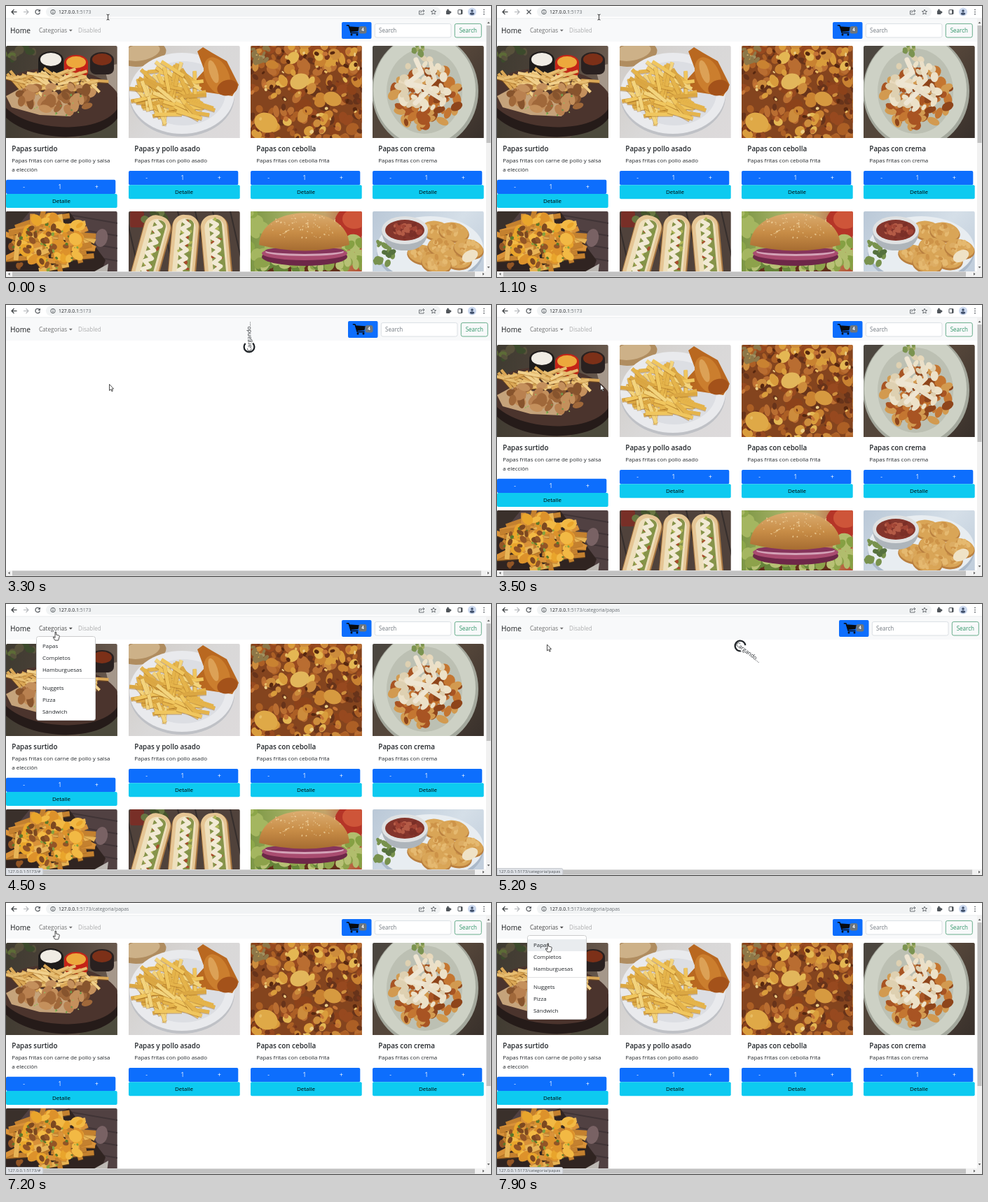
Recreate the animation shown at these times as an HTML page with a canvas. Size 692 by 388 pixels, loop 8000 ms.

```html
<!DOCTYPE html>
<html lang="es">
<head>
<meta charset="utf-8">
<title>Menú</title>
<style>
html, body { margin: 0; width: 692px; height: 388px; overflow: hidden; background: #fff; }
canvas { display: block; }
</style>
</head>
<body>
<canvas id="stage" width="692" height="388"></canvas>
<script>
const LOOP = 8000, TAU = Math.PI * 2;
const stage = document.getElementById('stage').getContext('2d');
let ctx = stage;

let seed = 1;
const rnd = () => (seed = seed * 16807 % 2147483647) / 2147483647;
const pick = list => list[Math.floor(rnd() * list.length)];

function rect(color, x, y, w, h, r = 0, border) {
  ctx.beginPath();
  ctx.roundRect(x, y, w, h, r);
  if (color) { ctx.fillStyle = color; ctx.fill(); }
  if (border) { ctx.strokeStyle = border; ctx.lineWidth = 1; ctx.stroke(); }
}
function oval(color, x, y, rx, ry = rx, turn = 0) {
  ctx.beginPath();
  ctx.ellipse(x, y, rx, ry, turn, 0, TAU);
  ctx.fillStyle = color;
  ctx.fill();
}
function ring(color, width, x, y, r, from = 0, to = TAU) {
  ctx.beginPath();
  ctx.arc(x, y, r, from, to);
  ctx.strokeStyle = color;
  ctx.lineWidth = width;
  ctx.stroke();
}
function trace(points) {
  ctx.beginPath();
  for (let i = 0; i < points.length; i += 2) ctx.lineTo(points[i], points[i + 1]);
}
function poly(color, ...points) {
  trace(points);
  ctx.closePath();
  ctx.fillStyle = color;
  ctx.fill();
}
function line(color, width, ...points) {
  trace(points);
  ctx.strokeStyle = color;
  ctx.lineWidth = width;
  ctx.stroke();
}
function text(str, x, y, size = 7.95, color = '#212529', weight = 400, align = 'left') {
  ctx.font = `${weight} ${size}px "Open Sans", "Noto Sans", sans-serif`;
  ctx.textAlign = align;
  ctx.fillStyle = color;
  ctx.fillText(str, x, y + size * 0.36);
}
function blend(x0, y0, x1, y1, ...colors) {
  const g = ctx.createLinearGradient(x0, y0, x1, y1);
  colors.forEach((c, i) => g.addColorStop(i / (colors.length - 1), c));
  return g;
}

// Scatter helpers: positions fall inside an ellipse.
function scatter(n, x, y, rx, ry, put) {
  for (let i = 0; i < n; i++) {
    const a = rnd() * TAU, d = Math.sqrt(rnd());
    put(x + Math.cos(a) * d * rx, y + Math.sin(a) * d * ry);
  }
}
function chunks(n, colors, x, y, rx, ry, small, big) {
  scatter(n, x, y, rx, ry, (px, py) => {
    const r = small + rnd() * (big - small);
    oval(pick(colors), px, py, r, r * (0.5 + rnd() * 0.4), rnd() * 3);
  });
}
function sticks(n, colors, x, y, rx, ry, length, width, lean = 0.6, spread = 2) {
  scatter(n, x, y, rx, ry, (px, py) => {
    const a = lean + (rnd() - 0.5) * spread, l = length * (0.6 + rnd() * 0.5) / 2;
    const dx = Math.cos(a) * l, dy = Math.sin(a) * l;
    line('rgba(150,92,20,.4)', width + 1, px - dx, py - dy + 0.8, px + dx, py + dy + 0.8);
    line(pick(colors), width, px - dx, py - dy, px + dx, py + dy);
  });
}
function dip(x, y, rx, ry, cup, sauce) {
  rect(cup, x - rx, y, rx * 2, ry * 1.9, [0, 0, 8, 8]);
  oval(cup, x, y, rx, ry);
  oval(sauce, x, y - 0.5, rx - 3, ry - 2.5);
}

const photos = [
  function mixedBoard() {
    rect(blend(0, 0, 159, 20, '#3f3b31', '#4d4239', '#6a5a4e'), 0, 0, 159, 132);
    chunks(10, ['#5d6b37', '#3c4a2c', '#57513b'], 16, 8, 26, 12, 4, 8);
    poly('#a5978a', 140, 30, 159, 26, 159, 66, 148, 62);
    poly('#4c4a3c', 128, 104, 159, 84, 159, 132, 104, 132);
    oval('#251b19', 76, 84, 88, 46, 0.08);
    oval('#4b342d', 76, 74, 86, 42, 0.08);
    poly('#c5a37b', 0, 72, 22, 60, 110, 78, 92, 101, 48, 99, 8, 88);
    dip(64, 20, 18, 12, '#1f1c1b', '#f0ece4');
    dip(100, 24, 17, 11, '#c42418', '#eda83c');
    dip(137, 20, 17, 11, '#2a2120', '#7c3018');
    sticks(60, ['#e7bd70', '#f1d08b', '#dba857'], 73, 52, 68, 14, 30, 4, 0.2, 1.4);
    chunks(42, ['#a0683a', '#b98150', '#87542d', '#c4905c'], 72, 74, 55, 20, 6, 11);
    chunks(12, ['#71984a', '#9cb461'], 80, 80, 46, 20, 1, 2);
  },
  function roastChicken() {
    rect(blend(0, 0, 159, 132, '#cfcac5', '#d9d8d8', '#dddadb'), 0, 0, 159, 132);
    oval('#b08d60', 20, 12, 34, 17, -0.2);
    oval('#cdb188', 18, 9, 27, 12, -0.2);
    oval('#bfc1c6', 76, 72, 75, 58);
    oval('#e9eaed', 76, 68, 75, 58);
    oval('#dcdee3', 78, 68, 60, 46);
    poly('#b96820', 98, 8, 106, 2, 119, 10, 140, 22, 157, 56, 148, 72, 108, 66, 90, 55, 108, 35);
    oval('#cb7e2e', 126, 43, 17, 28, -0.4);
    oval('#a4521a', 141, 60, 15, 11, -0.3);
    oval('#dca156', 121, 37, 6, 17, -0.3);
    sticks(92, ['#f0c65e', '#e5b44b', '#f3d47d', '#dba743'], 56, 66, 41, 34, 38, 5, 0.8, 2.2);
    sticks(15, ['#f0c65e', '#e5b44b'], 78, 90, 34, 12, 37, 5, 0.4, 1.2);
  },
  function onionPotatoes() {
    rect('#84441e', 0, 0, 159, 132);
    chunks(230, ['#8c421a', '#ac5f25', '#67331a', '#b96d31', '#97491f'], 80, 66, 112, 95, 4, 10);
    chunks(90, ['#d99c3c', '#c98231', '#e4b753', '#cd8c3c'], 80, 66, 104, 88, 4, 10);
    chunks(70, ['#57270f', '#76351a', '#c57435'], 80, 66, 110, 88, 2, 4);
    chunks(18, ['#a39261', '#8d7748'], 12, 8, 22, 16, 3, 7);
    oval('#dfa947', 22, 110, 17, 14, 0.4);
    oval('#e2b65b', 70, 51, 14, 11, -0.4);
    oval('#d69a40', 117, 76, 13, 10, 0.4);
    chunks(28, ['#eccd85', '#e7bd66'], 80, 66, 100, 83, 1, 3);
  },
  function creamPotatoes() {
    rect(blend(0, 0, 159, 132, '#4a4640', '#55463a', '#38302b'), 0, 0, 159, 132);
    oval('#a3a79c', 75, 65, 76, 82);
    oval('#cdd1c5', 74, 63, 73, 79);
    oval('#bcc0b3', 74, 65, 54, 61);
    chunks(85, ['#a85423', '#c47631', '#d29a50', '#8e451b'], 76, 74, 47, 45, 5, 10);
    chunks(42, ['#ece1c8', '#ded0b1', '#e8d9bc'], 72, 57, 36, 39, 4, 9);
    ctx.lineJoin = ctx.lineCap = 'round';
    line('#eee5d2', 7, 62, 20, 70, 38, 50, 54, 83, 61, 61, 82);
    line('#eadfc8', 6, 83, 25, 89, 48, 75, 62, 97, 76);
    ctx.lineCap = 'butt';
    chunks(9, ['#7b9350', '#a4ad68'], 70, 5, 12, 8, 3, 5);
  },
  function cheeseFries() {
    rect('#514142', 0, 0, 159, 132);
    for (let y = 5; y < 132; y += 18) line('#403436', 2, 90, y, 159, y + 12);
    oval('#796264', 136, 38, 9, 13, 0.2);
    poly('#3a302b', 0, 0, 34, 0, 16, 22, 0, 30);
    poly('#302421', 0, 35, 90, 0, 142, 70, 120, 132, 0, 132);
    poly('#bdb9b4', 112, 94, 146, 75, 139, 132, 97, 132);
    sticks(65, ['#d99239', '#e8b456', '#c4812f'], 62, 44, 55, 38, 42, 7, 0.65, 2.3);
    chunks(55, ['#e9a52c', '#f2b944', '#dd922b'], 66, 40, 48, 35, 5, 11);
    chunks(25, ['#7c4820', '#925526'], 48, 57, 48, 38, 3, 6);
    chunks(28, ['#5b792a', '#87a13d'], 56, 52, 48, 34, 1, 3);
  },
  function hotDogs() {
    rect('#50423b', 0, 0, 159, 132);
    for (let x = -30; x < 180; x += 25) line('#352e2c', 2, x, 0, x + 30, 132);
    rect('#782f27', 2, 0, 20, 23, 3);
    chunks(12, ['#45532c', '#687642'], 38, 10, 15, 14, 3, 7);
    for (let i = 0; i < 3; i++) {
      ctx.save();
      ctx.translate(33 + i * 46, 53);
      ctx.rotate(0.27 - i * 0.18);
      rect('#a97842', -20, -47, 40, 104, 17);
      rect('#e5c594', -19, -48, 37, 101, 16);
      rect('#eee0bd', -14, -43, 28, 91, 13);
      rect('#87944b', -7, -42, 18, 91, 8);
      chunks(24, ['#a74c2b', '#b0b657', '#819444'], 2, 2, 8, 44, 2, 4);
      const zig = [];
      for (let k = 0; k < 14; k++) zig.push(k % 2 ? 4 : -5, -40 + k * 6);
      ctx.lineJoin = 'round';
      line('#f2ead5', 6, ...zig);
      ctx.restore();
    }
  },
  function burger() {
    rect(blend(0, 0, 159, 0, '#7c9645', '#a1ae62', '#c4a36a', '#b24b32'), 0, 0, 159, 132);
    chunks(24, ['#8ca649', '#6c873a', '#a4b660'], 6, 40, 24, 45, 6, 13);
    oval('#b53528', 145, 16, 25, 23);
    oval('#ce5539', 148, 11, 17, 14);
    chunks(16, ['#85a043', '#b1bd6d'], 150, 61, 22, 24, 6, 11);
    rect('#62301c', 21, 72, 116, 36, 14);
    chunks(36, ['#8da24b', '#66843a', '#b7c175'], 78, 76, 68, 9, 6, 11);
    oval('#6d2748', 77, 65, 61, 13);
    oval('#a94c70', 77, 60, 61, 10);
    oval('#d3a2b7', 77, 58, 56, 6);
    oval('#86345b', 77, 56, 56, 5);
    ctx.beginPath();
    ctx.moveTo(12, 48);
    ctx.bezierCurveTo(14, -12, 138, -14, 141, 48);
    ctx.quadraticCurveTo(78, 65, 12, 48);
    ctx.fillStyle = blend(0, 3, 0, 58, '#dbac6f', '#c78c46', '#a46a30');
    ctx.fill();
    chunks(70, ['#eccb94', '#e2bd84'], 77, 22, 51, 18, 0.6, 1.4);
  },
  function nuggets() {
    rect(blend(0, 0, 159, 132, '#bac8d7', '#d5dfe8', '#b7c5d5'), 0, 0, 159, 132);
    oval('#abb9c9', 82, 58, 76, 47);
    oval('#e8edf1', 82, 53, 76, 46);
    chunks(14, ['#56713e', '#78924e'], 13, 60, 15, 20, 3, 7);
    const spots = [91, 27, 116, 29, 71, 61, 100, 51, 120, 68, 137, 53, 91, 74];
    for (let i = 0; i < spots.length; i += 2) {
      const [x, y] = [spots[i], spots[i + 1]];
      oval('#ba8040', x, y + 2, 22, 14, 0.2);
      oval('#d9a557', x, y, 21, 13, 0.2);
      chunks(18, ['#e5b970', '#cd9348', '#ddad64'], x, y, 17, 9, 2, 5);
    }
    oval('#efe2c6', 139, 64, 12, 8, -0.5);
    rect('#aeb5bb', 13, 28, 66, 28, [0, 0, 28, 28]);
    oval('#dfe1e2', 46, 27, 33, 20);
    oval('#84352c', 46, 27, 28, 15);
    chunks(30, ['#a14435', '#b45b46', '#7b2f27'], 46, 27, 22, 11, 2, 5);
  }
];

const COLS = [0, 175, 349, 523];
const DISHES = [
  ['Papas surtido', 'Papas fritas con carne de pollo y salsa', 'a elección'],
  ['Papas y pollo asado', 'Papas fritas con pollo asado'],
  ['Papas con cebolla', 'Papas fritas con cebolla frita'],
  ['Papas con crema', 'Papas fritas con crema']
];

function photo(i) {
  seed = 911 + i * 137;
  ctx.save();
  ctx.translate(COLS[i % 4], i < 4 ? 57 : 294);
  ctx.beginPath();
  ctx.roundRect(0, 0, 158.7, 132, [2, 2, 0, 0]);
  ctx.clip();
  photos[i]();
  ctx.restore();
}
function card([title, ...lines], i) {
  const x = COLS[i], y = 223.2 + lines.length * 12.8;
  text(title, x + 8.3, 204.5, 9.9, '#212529', 600);
  lines.forEach((l, k) => text(l, x + 8.3, 221.5 + k * 12.8));
  rect('#0d6efd', x, y, 156.3, 20.2, 2);
  text('-', x + 25.5, y + 10, 8.4, '#fff', 400, 'center');
  text('1', x + 77, y + 10, 8.4, '#fff', 400, 'center');
  text('+', x + 129.5, y + 10, 8.4, '#fff', 400, 'center');
  rect('#0dcaf0', x, y + 20.2, 158.7, 20, 2);
  text('Detalle', x + 79, y + 30.2, 8, '#000', 400, 'center');
}
function renderGrid(count) {
  const sheet = document.createElement('canvas');
  sheet.width = 692;
  sheet.height = 388;
  ctx = sheet.getContext('2d');
  for (let i = 0; i < count; i++) photo(i);
  DISHES.forEach(card);
  ctx = stage;
  return sheet;
}
const fullGrid = renderGrid(8), potatoGrid = renderGrid(5);

function toolbar(reloading, path) {
  const ink = '#50555a';
  rect('#fff', 0, 0, 692, 18);
  rect('#f1f3f4', 57, 1.5, 563, 14, 7);
  line('#3c4043', 1.2, 15.5, 8.5, 8, 8.5);
  line('#3c4043', 1.2, 11.5, 5, 8, 8.5, 11.5, 12);
  line('#b4b7ba', 1.1, 25, 8.5, 32, 8.5);
  line('#b4b7ba', 1.1, 28.5, 5, 32, 8.5, 28.5, 12);
  if (reloading) {
    line(ink, 1.2, 42.5, 5.5, 48.5, 11.5);
    line(ink, 1.2, 48.5, 5.5, 42.5, 11.5);
  } else {
    ring(ink, 1.2, 45.2, 8.5, 3.2, 0.2, 5.5);
    poly(ink, 49, 4.5, 49, 8, 45.5, 8);
  }
  ring(ink, 0.9, 67, 8.5, 3.2);
  line(ink, 1, 67, 8, 67, 10.5);
  line(ink, 1, 67, 6.2, 67, 7.2);
  text('127.0.0.1', 75, 8.7, 6.85, '#202124');
  const host = ctx.measureText('127.0.0.1').width;
  text(':5173' + path, 75 + host, 8.7, 6.85, '#6a6f74');

  line(ink, 0.8, 592, 7, 589.5, 7, 589.5, 12, 596, 12, 596, 10);
  line(ink, 0.8, 591.5, 10, 593, 7, 597, 7);
  line(ink, 0.8, 595, 5, 597, 7, 595, 9);
  const star = [];
  for (let k = 0; k <= 10; k++) {
    const a = k * Math.PI / 5 - Math.PI / 2, r = k % 2 ? 1.7 : 3.8;
    star.push(610 + Math.cos(a) * r, 8.8 + Math.sin(a) * r);
  }
  line(ink, 0.8, ...star);
  rect(ink, 628, 6.5, 5.5, 5.5, 1);
  oval(ink, 630.5, 6, 1.4);
  oval(ink, 634, 9, 1.4);
  rect(null, 645, 5.5, 6, 6, 0.5, ink);
  rect(ink, 649, 5.5, 2, 6);
  oval('#cbd8ee', 665, 8.5, 6);
  oval('#40506c', 665, 7, 1.8);
  oval('#40506c', 665, 11, 3.2, 1.8);
  for (const y of [5.3, 8.5, 11.7]) oval(ink, 682, y, 0.85);
}

function navbar(shift, open) {
  rect('#f8f9fa', 0, 18, 692, 33);
  rect('#e4e6e8', 0, 17.5, 692, 0.7);
  text('Home', 6, 35.5, 10.2, '#1b1d1f');
  const link = `rgba(0,0,0,${open ? 0.7 : 0.55})`;
  text('Categorias', 47, 35.3, 8.1, link);
  poly(link, 89.8, 33.8, 94.8, 33.8, 92.3, 36.4);
  text('Disabled', 103, 35.3, 8.1, 'rgba(0,0,0,.3)');
  ctx.save();
  ctx.translate(shift, 0);
  rect('#0d6efd', 479, 23, 42.5, 24, 2);
  ctx.lineJoin = 'round';
  line('#080b10', 1.4, 485.8, 27.8, 489, 27.8, 492.2, 38.5, 502.5, 38.5);
  poly('#080b10', 489, 29.3, 504, 30.3, 502.3, 36.2, 491.5, 37);
  oval('#080b10', 493, 41, 1.5);
  oval('#080b10', 501, 41, 1.5);
  rect('#6c757d', 503.5, 29, 11, 10.5, 3);
  text('4', 509, 34.3, 6.1, '#fff', 700, 'center');
  rect('#fff', 526.3, 25.4, 108.7, 19.6, 2.5, '#dbdfe3');
  text('Search', 532, 35.3, 8.05, '#747b82');
  rect(null, 640.3, 25.4, 38, 19.6, 2.5, '#68ad8c');
  text('Search', 659.3, 35.3, 8.05, '#2f9467', 400, 'center');
  ctx.restore();
}

function scrollbars(thumb) {
  const right = thumb ? 685 : 692, ink = '#606060';
  rect('#f1f1f1', 0, 380, 692, 8);
  rect('#c1c1c1', 9, 380.5, right - 23 + (thumb ? -2 : 0), 7);
  poly(ink, 3, 383.8, 5.5, 381.8, 5.5, 385.8);
  poly(ink, right - 2.5, 383.8, right - 5, 381.8, right - 5, 385.8);
  if (!thumb) return;
  rect('#f1f1f1', 685, 18, 7, 362);
  rect('#c1c1c1', 685.5, 28, 6, thumb);
  poly(ink, 688.5, 22.5, 686.6, 25, 690.4, 25);
  poly(ink, 688.5, 375.5, 686.6, 373, 690.4, 373);
}

function menu(hover) {
  rect('#fff', 43.5, 46.5, 84, 120, 3, '#cbcccd');
  if (hover) rect('#e9ecef', 44, 52, 83, 17);
  ['Papas', 'Completos', 'Hamburguesas', 'Nuggets', 'Pizza', 'Sándwich'].forEach((item, i) =>
    text(item, 52, 60.3 + i * 17 + (i > 2 ? 8.7 : 0)));
  line('#d9dadb', 0.8, 44, 106.5, 127, 106.5);
}

function status(path) {
  const str = '127.0.0.1:5173' + path;
  ctx.font = '400 6px "Open Sans", "Noto Sans", sans-serif';
  rect('#dee1e6', 0, 378.5, ctx.measureText(str).width + 6, 10, [0, 2, 0, 0], '#c8cbd0');
  text(str, 2.5, 383.3, 6, '#4f5458');
}

function spinner(degrees) {
  ctx.save();
  ctx.translate(347, 60);
  ctx.rotate(degrees * Math.PI / 180);
  ring('#212529', 2.3, 0, 0, 7.4, Math.PI / 4, Math.PI * 7 / 4);
  text('Cargando...', -6.3, 0.2);
  ctx.restore();
}

const cursors = {
  beam() {
    line('#222', 0.9, -2, -4, 0, -3.4, 2, -4);
    line('#222', 0.9, 0, -3.5, 0, 3.5);
    line('#222', 0.9, -2, 4, 0, 3.4, 2, 4);
  },
  arrow() {
    const shape = [0, 0, 0, 9, 2, 7.2, 3.5, 10.2, 4.8, 9.6, 3.4, 6.7, 6, 6.5];
    poly('#fff', ...shape);
    line('#222', 0.8, ...shape, 0, 0);
  },
  hand() {
    const shape = [0, 0, 1.4, 0, 1.6, 4, 5.6, 5, 6.3, 6.2, 5.3, 10, 4.7, 12, 0, 12, -2.7, 8, -2.2, 7, 0, 8.4];
    poly('#fff', ...shape);
    line('#222', 0.8, ...shape, 0, 0);
  }
};
// Each stop: time, x, y, and the pointer shown from then on.
const route = [
  [0, 145.5, 16, 'beam'], [1300, 145.5, 16, 'arrow'], [1850, 353, 69, 'beam'],
  [2900, 353, 69, 'arrow'], [3300, 147.5, 113.5, 'arrow'], [3700, 147.5, 113.5, 'arrow'],
  [4150, 70, 40, 'hand'], [4600, 70, 40, 'hand'], [4850, 71.5, 58, 'hand'],
  [5100, 71.5, 58, 'arrow'], [6000, 71.5, 58, 'arrow'], [6300, 70, 52, 'arrow'],
  [6900, 70, 52, 'arrow'], [7100, 70, 40, 'hand'], [7450, 70, 40, 'hand'],
  [7700, 72, 58, 'hand'], [LOOP, 72, 58, 'hand']
];
function pointer(t) {
  const i = route.findIndex(stop => stop[0] > t) - 1;
  const [t0, x0, y0, kind] = route[i], [t1, x1, y1] = route[i + 1];
  const p = (t - t0) / (t1 - t0), e = p * p * (3 - 2 * p);
  ctx.save();
  ctx.translate(x0 + (x1 - x0) * e, y0 + (y1 - y0) * e);
  cursors[kind]();
  ctx.restore();
}

const within = (t, a, b) => t >= a && t < b;
function draw(t) {
  const firstLoad = within(t, 1250, 3400), secondLoad = within(t, 5050, 6900);
  const loading = firstLoad || secondLoad;
  const filtered = t >= 5050;
  const open = within(t, 4250, 5050) || t >= 7350;
  const hover = within(t, 4720, 5050) || t >= 7600;

  rect('#fff', 0, 0, 692, 388);
  if (!loading) ctx.drawImage(filtered ? potatoGrid : fullGrid, 0, 0);
  toolbar(within(t, 1050, 1600), filtered ? '/categoria/papas' : '');
  navbar(loading ? 9 : 0, open);
  scrollbars(loading ? 0 : filtered ? 234 : 168);
  if (firstLoad) spinner(114 + (t - 2200) * 0.467);
  if (secondLoad) spinner(-29 + (t - 6600) * 0.467);
  if (open) menu(hover);
  if (hover || within(t, 5050, 5600)) status('/categoria/papas');
  else if (within(t, 4100, 4720) || within(t, 7050, 7600)) status('/#');
  pointer(t);
}

function tick() {
  draw(performance.now() % LOOP);
  requestAnimationFrame(tick);
}
tick();
</script>
</body>
</html>
```
